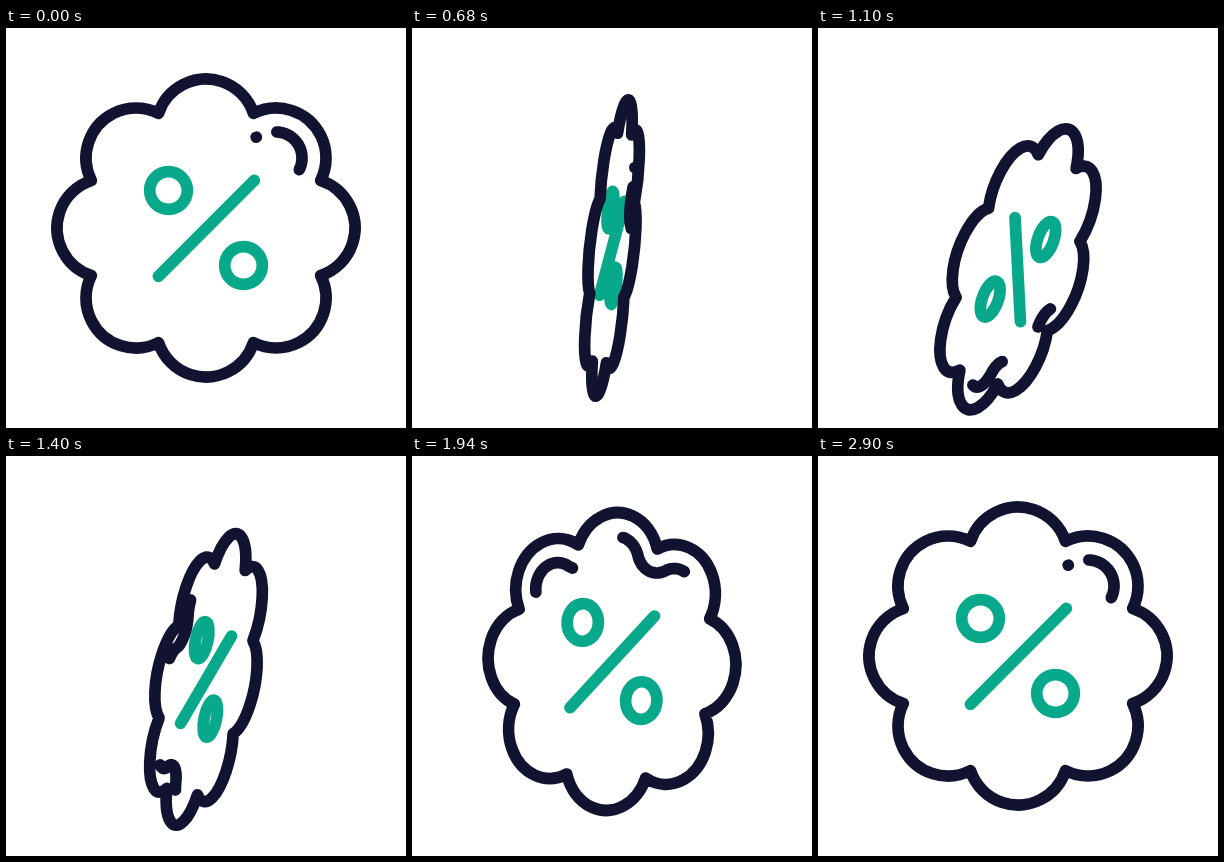
An HTML page with a canvas that plays this animation: 400 px wide and 400 px high, repeating every 2930 ms.

```html
<!DOCTYPE html>
<html lang="en">
<head>
<meta charset="utf-8">
<title>Discount badge</title>
<style>
  html, body { margin: 0; width: 100%; height: 100%; overflow: hidden; background: #fff; }
  canvas { display: block; width: 100vw; height: 100vh; }
</style>
</head>
<body>
<canvas id="stage" width="400" height="400"></canvas>
<script>
const ctx = document.getElementById('stage').getContext('2d');
const LOOP = 2930, REST = 500, STEP = 30, LAST = 80;
const NAVY = '#121331', TEAL = '#08a88a', WEIGHT = 11.7;
const RAD = Math.PI / 180;

// Badge: eight round lobes; the shine runs on a line inset from its edge.
const DIST = 99, LOBE = 50, INSET = 24, SHINE = LOBE - INSET;
const HALF = 22.5 * RAD;
const NOTCH = DIST * Math.cos(HALF) + Math.sqrt(LOBE ** 2 - (DIST * Math.sin(HALF)) ** 2);
const OPEN = Math.atan2(NOTCH * Math.sin(HALF), NOTCH * Math.cos(HALF) - DIST);
const ARC_LEN = 2 * OPEN * SHINE;
const PERIOD = ARC_LEN + (2 * OPEN - 2 * HALF) * INSET;
const LAP = 8 * PERIOD;

// Smooth monotone curve through [step, value] keys.
function track(keys) {
  const d = keys.slice(1).map((k, i) => (k[1] - keys[i][1]) / (k[0] - keys[i][0]));
  const m = keys.map((_, i) => {
    const a = d[i - 1], b = d[i];
    return a * b > 0 ? 2 * a * b / (a + b) : 0;
  });
  return n => {
    let i = 0;
    while (i < keys.length - 2 && n > keys[i + 1][0]) i++;
    const [x0, y0] = keys[i], [x1, y1] = keys[i + 1];
    const w = x1 - x0, t = (n - x0) / w, t2 = t * t, t3 = t2 * t;
    return y0 * (2 * t3 - 3 * t2 + 1) + y1 * (3 * t2 - 2 * t3)
      + w * (m[i] * (t3 - 2 * t2 + t) + m[i + 1] * (t3 - t2));
  };
}

const flip = track([[0, 1], [6, .15], [13, -.985], [18, -.585], [30, .33],
  [36, .59], [48, .832], [54, .9], [64, .963], [72, .99], [80, 1]]);
const drop = track([[0, 0], [6, 20], [13, 46.6], [18, 43.6], [30, 23.4],
  [36, 14], [48, 5.5], [54, 3.6], [64, 1.1], [80, 0]]);
const tilt = track([[0, 0], [6, 6.3], [13, 18.2], [17, 20.8], [30, 12],
  [36, 7.5], [48, 2.9], [64, .5], [80, 0]]);

// Ends of the two shine strokes, as lengths along the inset line.
const dotTail = track([[0, -8.5], [6, 40], [13, 73], [30, 376], [48, 646], [64, 795], [80, LAP - 8.5]]);
const dotHead = track([[0, -8.5], [6, 40], [13, 73], [30, 450], [48, 709], [64, 819], [80, LAP - 8.5]]);
const arcTail = track([[0, 13], [6, 60], [13, 124], [30, 578], [48, 783], [64, 852], [80, LAP + 13]]);
const arcHead = track([[0, 65], [6, 114], [13, 178], [30, 655], [48, 875], [64, LAP + 65], [80, LAP + 65]]);

const polar = (r, a) => [r * Math.cos(a), r * Math.sin(a)];

function shinePoint(s) {
  const k = Math.floor(s / PERIOD), u = s - k * PERIOD;
  const a = (k - 1) * 2 * HALF;
  const onLobe = u < ARC_LEN;
  const [cx, cy] = onLobe ? polar(DIST, a) : polar(NOTCH, a + HALF);
  const [dx, dy] = onLobe
    ? polar(SHINE, a - OPEN + u / SHINE)
    : polar(INSET, a + OPEN + Math.PI - (u - ARC_LEN) / INSET);
  return [cx + dx, cy + dy];
}

function outline() {
  for (let i = 0; i < 8; i++) {
    const a = i * 2 * HALF, [x, y] = polar(DIST, a);
    ctx.arc(x, y, LOBE, a - Math.PI + Math.asin(0) + (Math.PI - OPEN * LOBE / LOBE), a + OPEN);
  }
  ctx.closePath();
}

function shine(from, to) {
  const len = Math.max(to - from, .1), parts = Math.ceil(len / 2);
  for (let i = 0; i <= parts; i++) {
    const [x, y] = shinePoint(from + len * i / parts);
    if (i) ctx.lineTo(x, y); else ctx.moveTo(x, y);
  }
}

function percent() {
  for (const c of [-37.5, 37.5]) {
    ctx.moveTo(c + 18.8, c);
    ctx.arc(c, c, 18.8, 0, 2 * Math.PI);
    ctx.closePath();
  }
  ctx.moveTo(48.3, -47.6);
  ctx.lineTo(-47.6, 48.3);
}

// The shape is squeezed and tilted, the line weight is not.
function ink(color, sx, y, angle, build) {
  ctx.save();
  ctx.translate(200, 200 + y);
  ctx.rotate(angle);
  ctx.scale(Math.abs(sx) < .002 ? .002 : sx, 1);
  ctx.beginPath();
  build();
  ctx.restore();
  ctx.strokeStyle = color;
  ctx.stroke();
}

function draw(n) {
  const sx = flip(n), y = drop(n), angle = tilt(n) * RAD;
  ctx.fillStyle = '#fff';
  ctx.fillRect(0, 0, 400, 400);
  ctx.lineWidth = WEIGHT;
  ctx.lineCap = ctx.lineJoin = 'round';
  ink(TEAL, sx, y, angle, percent);
  ink(NAVY, Math.abs(sx), y, angle, () => {
    outline();
    shine(dotTail(n), dotHead(n));
    shine(arcTail(n), arcHead(n));
  });
}

const start = performance.now();
function frame() {
  const t = (performance.now() - start) % LOOP;
  draw(Math.min(LAST, Math.max(0, Math.floor((t - REST) / STEP))));
  requestAnimationFrame(frame);
}
frame();
</script>
</body>
</html>
```
